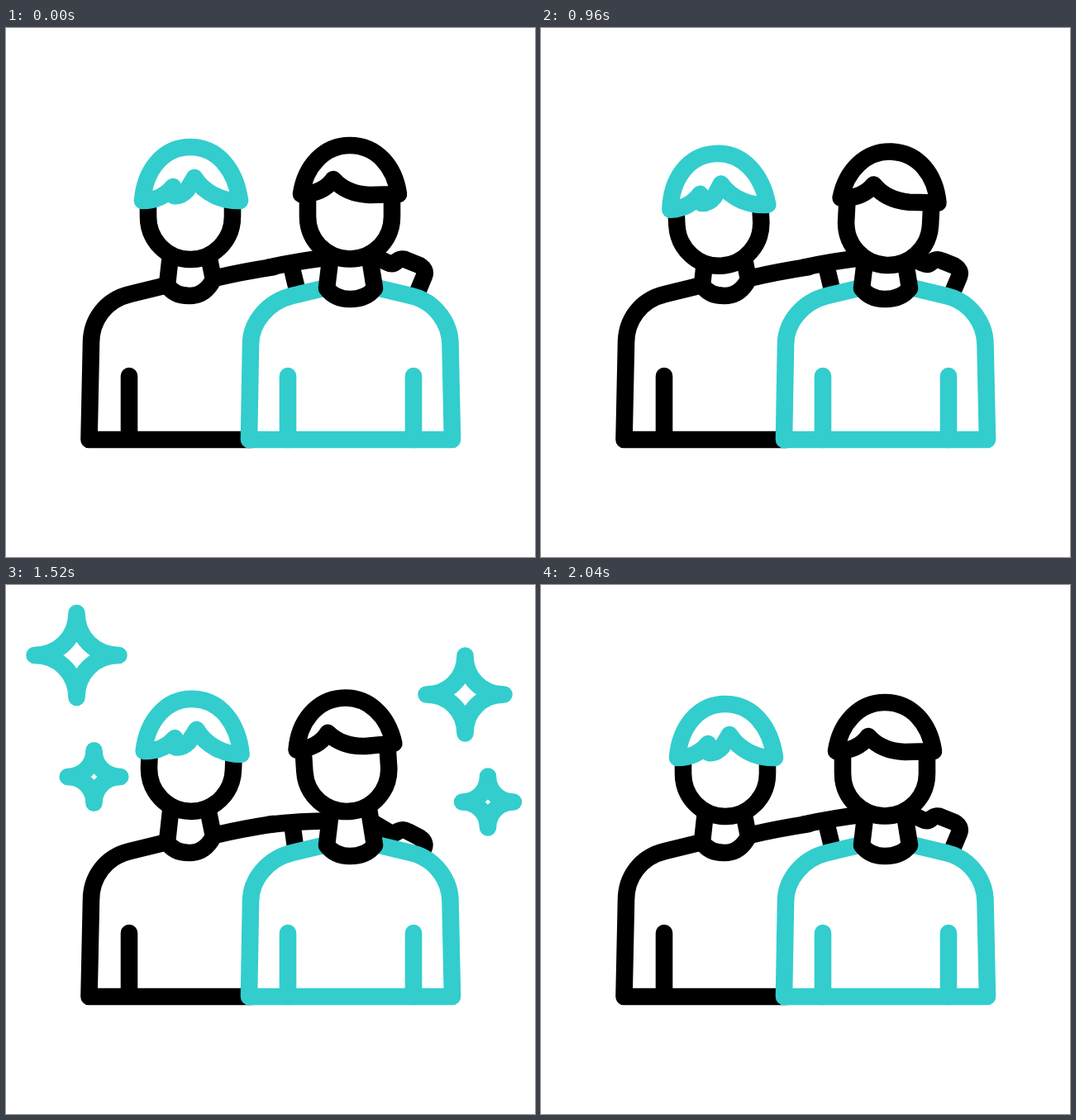
An HTML page that plays this animation: 640 by 640 pixels, repeating every 2.4 s.

```html
<!DOCTYPE html>
<html lang="en">
<head>
<meta charset="utf-8">
<title>Two friends</title>
<style>
  html, body { margin: 0; width: 100%; height: 100%; overflow: hidden; background: #fff; }
  svg { display: block; width: 100vw; height: 100vh; }
  .line { fill: none; stroke: #000; stroke-width: 20.6; stroke-linejoin: round; }
  .solid { fill: #fff; }
  .teal { stroke: #33cdcd; }
  .round { stroke-linecap: round; }
</style>
</head>
<body>
<svg viewBox="0 0 640 640">
  <!-- left body and upper arm -->
  <path class="line round" d="M195 311L150 322C120 329 103 354 103 381L100.5 498H296M149 421V498"/>
  <path class="line round" d="M251 303Q285 295 324 289"/>

  <g id="arm">
    <path class="line" d="M316 290Q355 281.5 392 277.5M345 287L352 316"/>
    <path class="line" d="M438 273L462 284Q468 287 473 282Q479 278 485 281L500 287Q509 292 506 300L496 324"/>
  </g>

  <path class="line solid teal round" d="M388 314L346 324C317 331 296 356 296 383L294 498H540L537.5 383C537.5 358 520 331 490 324L448 314"/>
  <path class="line teal round" d="M341 421V498M493 421V498"/>

  <!-- necks -->
  <path class="line solid" d="M200 265L195 311Q203 324 222 324Q241 324 251 304L243 265"/>
  <path class="line solid" d="M394 265L388 315Q398 328 416 328Q436 328 446 315L438 265"/>

  <g id="headL">
    <path class="line solid" d="M172 212V228C172 257 195 280 223 280C251 280 274 257 274 228V212"/>
    <path class="line solid teal" d="M165 209C168 172 190 144 223 144C256 144 278 172 283 209C262 210 240 200 228 181L219 196Q212 204 203 203L202 192C193 203 180 209 165 209Z"/>
  </g>
  <g id="headR">
    <path class="line solid" d="M365 203V228C365 257 388 279.5 416 279.5C444 279.5 467 257 467 228V203"/>
    <path class="line solid" d="M357 201C362 167 385 142 416 142C448 142 470 167 475 201L440 202Q412 201 396 183Q383 201 357 201Z"/>
  </g>
  <g id="stars"></g>
</svg>
<script>
const LOOP = 2400, STEP = 40;
const $ = id => document.getElementById(id);

// Smooth interpolation through [time, value] keys
function keyed(keys, t) {
  if (t <= keys[0][0]) return keys[0][1];
  for (let i = 1; i < keys.length; i++) {
    const [t0, a] = keys[i - 1], [t1, b] = keys[i];
    if (t < t1) {
      const u = (t - t0) / (t1 - t0);
      return a + (b - a) * u * u * (3 - 2 * u);
    }
  }
  return keys[keys.length - 1][1];
}

const pat = [[200, 0], [600, 7.4], [1000, 0], [1400, 7.4], [1800, 0]];
const low = [[200, 0], [540, 1], [880, 1], [1300, 0]];
const high = [[880, 0], [1300, 1], [1400, 1], [1900, 0]];

// Poses are [dx, dy, degrees]
const heads = [
  { el: $('headL'), x: 223, y: 212, down: [-9.6, 9.4, -3.5], up: [1.8, -7.2, 2.2] },
  { el: $('headR'), x: 416, y: 210, down: [6.2, 9, 3.7], up: [-5.8, -6.4, -4.4] }
];

const bigSize = [[0, 0], [320, 47], [520, 51], [800, 55]];
const smallSize = [[0, 0], [130, 40], [400, 28.5], [740, 40]];
const bigFade = [[750, 1], [840, 0]];
const smallFade = [[660, 1], [780, 0]];

const stars = [
  { x: 85.5, y: 85, start: 1000, size: bigSize, fade: bigFade },
  { x: 106.5, y: 232, start: 1000, size: smallSize, fade: smallFade },
  { x: 555.5, y: 132.5, start: 1200, size: bigSize, fade: bigFade },
  { x: 583, y: 262.5, start: 1200, size: smallSize, fade: smallFade }
];
for (const s of stars) {
  s.el = document.createElementNS('http://www.w3.org/2000/svg', 'path');
  s.el.setAttribute('class', 'line teal');
  s.el.setAttribute('transform', `translate(${s.x} ${s.y})`);
  $('stars').append(s.el);
}

function starPath(r) {
  const k = r * 0.43;
  return `M0 ${-r}C0 ${-k} ${k} 0 ${r} 0C${k} 0 0 ${k} 0 ${r}` +
    `C0 ${k} ${-k} 0 ${-r} 0C${-k} 0 0 ${-k} 0 ${-r}Z`;
}

function draw(t) {
  $('arm').setAttribute('transform', `rotate(${keyed(pat, t)} 316 302)`);

  const d = keyed(low, t), u = keyed(high, t);
  for (const h of heads) {
    const [dx, dy, deg] = h.down.map((v, i) => v * d + h.up[i] * u);
    h.el.setAttribute('transform', `translate(${dx} ${dy}) rotate(${deg} ${h.x} ${h.y})`);
  }

  for (const s of stars) {
    const age = t - s.start;
    s.el.setAttribute('d', starPath(keyed(s.size, age)));
    s.el.setAttribute('opacity', age > 0 ? keyed(s.fade, age) : 0);
  }
}

function tick(now) {
  draw(Math.floor((now % LOOP) / STEP) * STEP);
  requestAnimationFrame(tick);
}
draw(0);
requestAnimationFrame(tick);
</script>
</body>
</html>
```
